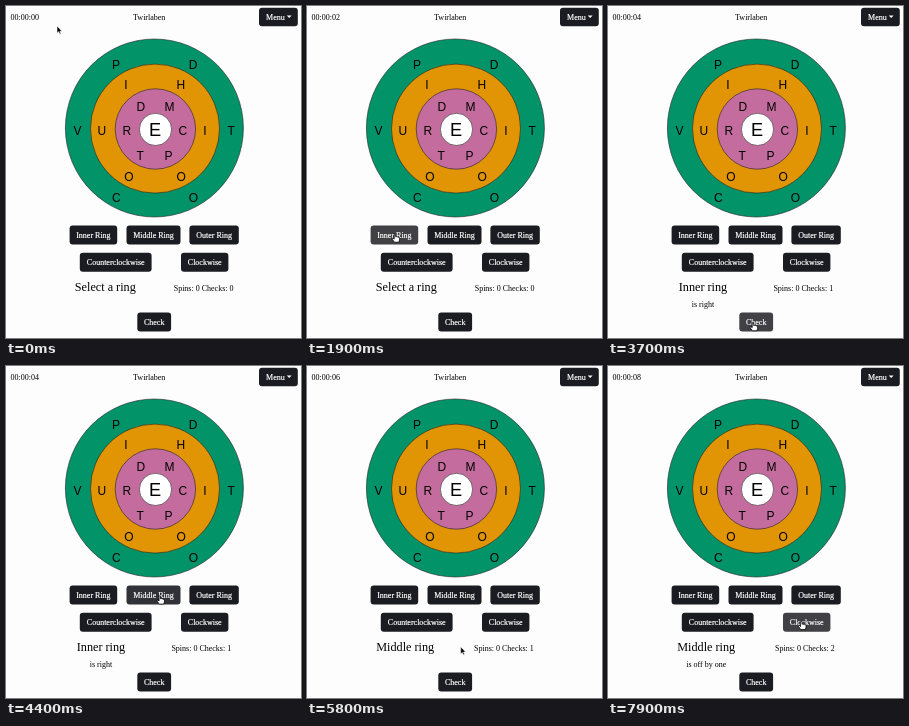
Recreate the animation shown at these times as an HTML page. Size 295 by 332 pixels, loop 8 s.

```html
<!DOCTYPE html>
<html lang="en">
<head>
<meta charset="utf-8">
<title>Ring puzzle</title>
<style>
html, body { margin: 0; width: 100%; height: 100%; overflow: hidden; background: #fdfdfd; }
svg { display: block; width: 295px; height: 332px; }
text { font: 8px "Liberation Serif", "Times New Roman", serif; fill: #000; text-anchor: middle; }
.label { fill: #fff; stroke: #fff; stroke-width: 0.2px; }
.letter { font: 12px "Liberation Sans", Arial, sans-serif; }
.start { text-anchor: start; }
</style>
</head>
<body>
<svg id="stage" viewBox="0 0 295 332"></svg>
<script>
const LOOP = 8000;
const stage = document.getElementById("stage");

function add(tag, attrs, text = "") {
  const el = document.createElementNS("http://www.w3.org/2000/svg", tag);
  for (const k in attrs) el.setAttribute(k, attrs[k]);
  el.textContent = text;
  return stage.appendChild(el);
}

// Header
const clock = add("text", { x: 4.6, y: 13.7, class: "start" });
add("text", { x: 143.2, y: 13.7 }, "Twirlaben");

// Rings: centre, radius, colour
[
  [148.4, 122, 89, "#029369"],
  [149, 122.6, 64.5, "#e19404"],
  [149.4, 123, 40.2, "#c56c9f"],
  [149.5, 123.4, 16.1, "#fff"]
].forEach(([cx, cy, r, fill]) =>
  add("circle", { cx, cy, r, fill, stroke: "#222", "stroke-width": 0.6 }));

// Six letters per ring, set from their left edges: top, middle and bottom pair
function ringLetters(word, near, far, rise) {
  [...word].forEach((ch, i) => {
    const row = (i >> 1) - 1;
    const dx = (row ? near : far) * (i % 2 ? 1 : -1);
    add("text", { x: 144.4 + dx, y: 129.2 + row * rise, class: "letter start" }, ch);
  });
}
ringLetters("PDVTCO", 38.4, 77, 66.5);
ringLetters("IHUIOO", 26.2, 52.8, 46);
ringLetters("DMRCTP", 14, 28, 24.6);
add("text", { x: 149, y: 130.4, class: "letter", style: "font-size:18.2px" }, "E");

// Buttons
const buttons = [
  ["Menu", 253, 1.7, 38.8, 18.6],
  ["Inner Ring", 63.6, 219.6, 47.6, 19],
  ["Middle Ring", 120.5, 219.6, 54, 19],
  ["Outer Ring", 183.4, 219.6, 49.4, 19],
  ["Counterclockwise", 73.8, 246.8, 71.8, 19],
  ["Clockwise", 175, 246.8, 47.4, 19],
  ["Check", 131.3, 306.6, 33.8, 19]
].map(([label, x, y, width, height], i) => {
  const rect = add("rect", { x, y, width, height, rx: 3 });
  add("text", { x: x + width / 2 - (i ? 0 : 3), y: y + 12, class: "label" }, label);
  return { rect, x, y, width, height };
});
add("path", { d: "M280.8 9.6h4.8l-2.4 2.4z", fill: "#fff" });

// Status line
const title = add("text", { y: 284.6, style: "font-size:12.2px" });
const score = add("text", { y: 284.8, class: "start" });
const verdict = add("text", { y: 300.5 });

// Pointers, each with its hot spot at 0,0
const arrow = add("path", {
  d: "M0 0V7.2L1.7 5.7 2.8 8.2 4 7.7 2.9 5.2H5z",
  fill: "#000", stroke: "#fff", "stroke-width": 0.6
});
const hand = add("path", {
  d: "M-.8 .2Q0-.6 .7.2V2.8Q1.5 2.3 2.1 3 2.9 2.6 3.4 3.3 4.5 3 4.6 4.1V6L3.8 8.2H-.6L-2.9 5.1Q-3.1 3.8-1.9 4.2L-.8 5.1z",
  fill: "#fff", stroke: "#000", "stroke-width": 0.8, "stroke-linejoin": "round"
});

// time, x, y
const path = [
  [0, 51, 20], [150, 51, 20], [900, 86, 199], [1200, 85, 196], [1700, 88, 228],
  [2050, 88, 228], [2600, 135.6, 299], [2950, 145, 316.6], [3800, 145, 316.6],
  [4450, 154, 228.5], [5350, 154, 228.5], [6150, 153.4, 316.4], [7150, 153.4, 316.4],
  [7800, 193.4, 255.4], [8000, 193.4, 255.4]
];

function pointerAt(t) {
  t = Math.max(0, t);
  const i = path.findIndex(p => p[0] > t);
  const [t0, x0, y0] = path[i - 1], [t1, x1, y1] = path[i];
  const u = (t - t0) / (t1 - t0), e = u * u * (3 - 2 * u);
  return [x0 + (x1 - x0) * e, y0 + (y1 - y0) * e];
}

const over = (b, [x, y]) =>
  x > b.x && x < b.x + b.width && y > b.y && y < b.y + b.height;

// start, title, title x, score x, checks, verdict
const states = [
  [0, "Select a ring", 99.3, 167.7, 0, ""],
  [1950, "Inner ring", 95, 165.4, 0, ""],
  [3250, "Inner ring", 95, 165.4, 1, "is right"],
  [4750, "Middle ring", 98.2, 167, 1, ""],
  [6450, "Middle ring", 98.2, 167, 2, "is off by one"]
];

function draw(t) {
  clock.textContent = "00:00:0" + Math.floor((t + 400) / 1000);

  const [, name, tx, sx, checks, result] = states.filter(s => s[0] <= t).pop();
  title.textContent = name;
  title.setAttribute("x", tx);
  score.textContent = `Spins: 0 Checks: ${checks}`;
  score.setAttribute("x", sx);
  verdict.textContent = result;
  verdict.setAttribute("x", tx);

  // Hover fades over 150 ms: average the recent pointer positions
  const recent = [0, 30, 60, 90, 120].map(d => pointerAt(t - d));
  for (const b of buttons) {
    const h = recent.filter(p => over(b, p)).length / recent.length;
    b.rect.setAttribute("fill", `rgb(${27 + 37 * h},${28 + 36 * h},${33 + 36 * h})`);
  }

  const pos = recent[0], hot = buttons.some(b => over(b, pos));
  for (const [el, on] of [[arrow, !hot], [hand, hot]]) {
    el.setAttribute("transform", `translate(${pos})`);
    el.setAttribute("visibility", on ? "visible" : "hidden");
  }
}

const begin = performance.now();
function frame() {
  draw((performance.now() - begin) % LOOP);
  requestAnimationFrame(frame);
}
frame();
</script>
</body>
</html>
```
